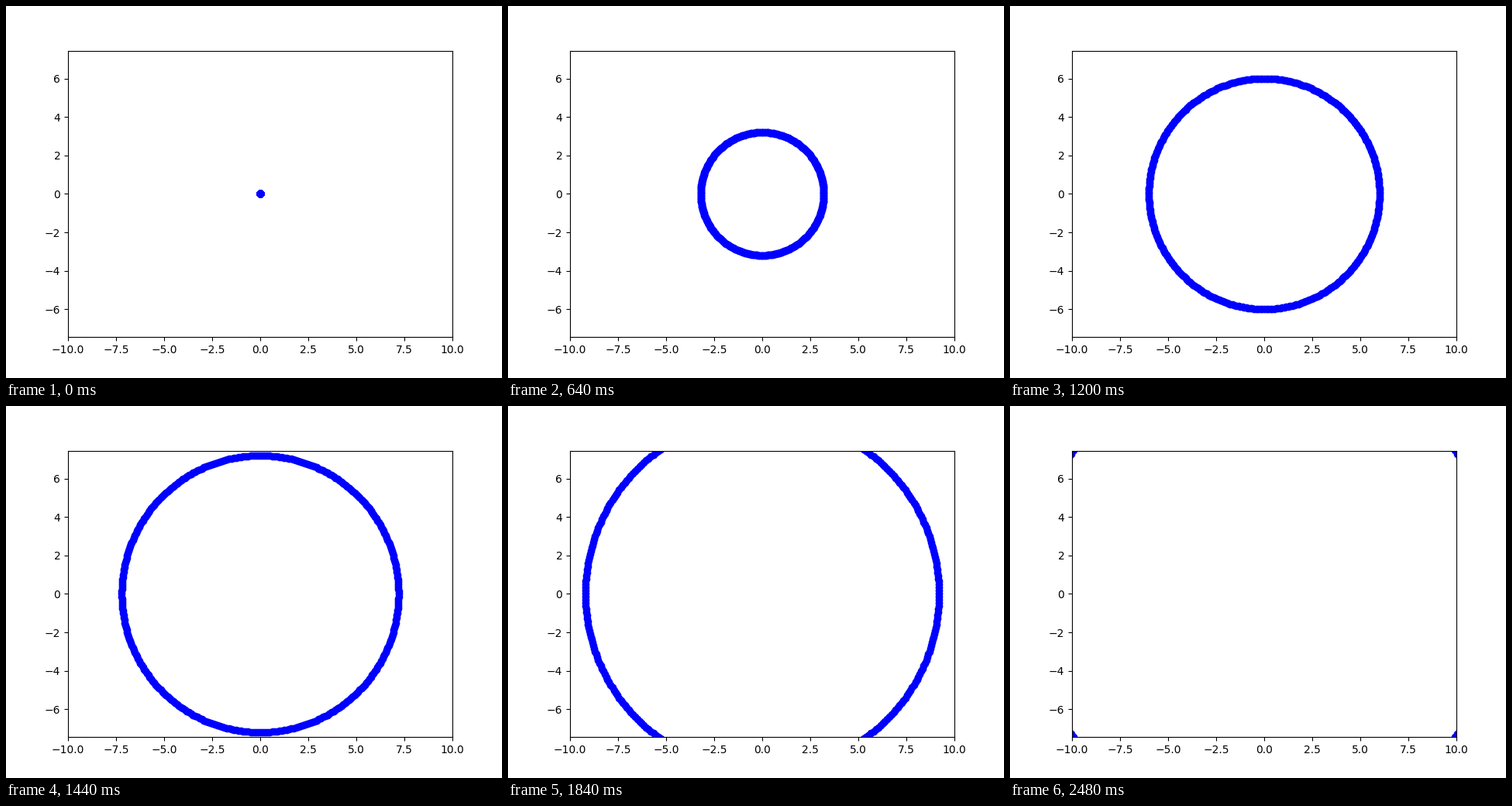
Write a matplotlib script that moves like this. It is 640x480 px and loops after 2.52 s.

```python
import numpy as np
import matplotlib.pyplot as plt
from matplotlib.animation import FuncAnimation

FRAMES = 63
INTERVAL = 40      # ms
SPEED = 0.2        # radius gained per frame
PARTICLES = 360

fig, ax = plt.subplots(figsize=(6.4, 4.8), dpi=100)

# Same scale on both axes: the y range follows from the shape of the axes.
box = ax.get_window_extent()
half_height = 10 * box.height / box.width
ax.set_xlim(-10, 10)
ax.set_ylim(-half_height, half_height)

angles = np.radians(np.arange(PARTICLES) * 360 / PARTICLES)
dots, = ax.plot([], [], "bo", markersize=6)


def update(frame):
    radius = SPEED * frame
    dots.set_data(radius * np.cos(angles), radius * np.sin(angles))
    return dots,


anim = FuncAnimation(fig, update, frames=FRAMES, interval=INTERVAL,
                     init_func=lambda: update(0), repeat=True, repeat_delay=0)
plt.show()
```
